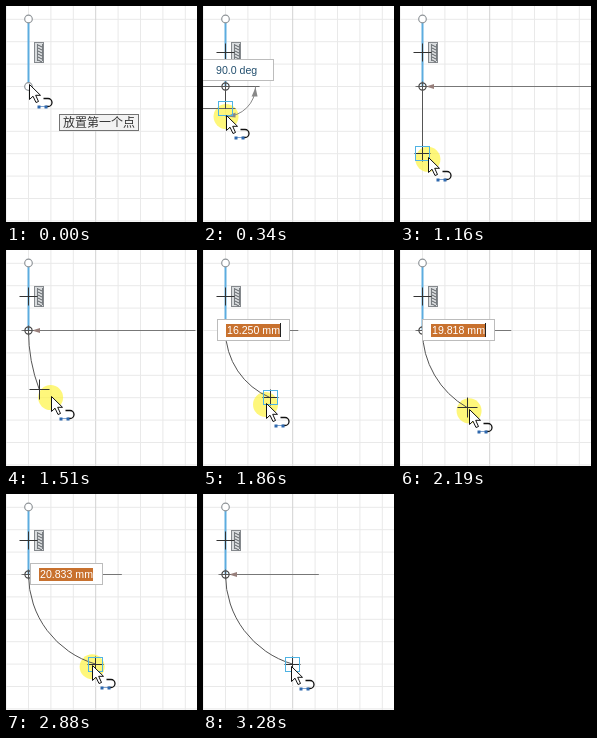
An HTML page with a canvas that plays this animation: 191 px wide and 216 px high, repeating every 3480 ms.

```html
<!DOCTYPE html>
<html lang="zh">
<head>
<meta charset="utf-8">
<style>
html, body { margin: 0; width: 100%; height: 100%; overflow: hidden; background: #fff; }
canvas { display: block; width: 191px; height: 216px; }
</style>
</head>
<body>
<canvas id="stage" width="191" height="216"></canvas>
<script>
const ctx = document.getElementById('stage').getContext('2d');
const LOOP = 3480, MM = 4.48, CELL = 5 * MM;
const X0 = 22.5, Y0 = 80.5;            // first point of the arc
const PLACED = 70, CURVED = 1030, BOX_OUT = 3280;

// Pointer stops: time, x, y
const STOPS = [
  [70, 23, 78], [720, 24, 135], [1030, 24, 135], [1250, 30, 158],
  [1460, 33, 139], [1510, 45, 146], [1790, 63, 153], [2060, 63, 153],
  [2410, 76.26, 165.803], [2480, 76.26, 165.803], [3000, 88, 172], [LOOP, 88, 172]
];

const easeOut = p => 1 - Math.pow(1 - p, 1.46);

function pointerAt(t) {
  t = Math.max(t, STOPS[0][0]);
  const i = STOPS.findIndex(s => s[0] > t);
  const [t1, x1, y1] = STOPS[i - 1], [t2, x2, y2] = STOPS[i];
  const p = easeOut((t - t1) / (t2 - t1));
  return [x1 + (x2 - x1) * p, y1 + (y2 - y1) * p];
}

// The end point trails the pointer a little and sticks to nearby grid nodes.
function endAt(t) {
  const [px, py] = pointerAt(t - 50);
  const dx = t < CURVED ? 0 : (px - X0) / MM, dy = (py - 80) / MM;
  const gx = Math.round(dx / 5) * 5, gy = Math.round(dy / 5) * 5;
  const snapped = gy > 0 && Math.hypot(dx - gx, dy - gy) < 1.8;
  return snapped ? [gx, gy, true] : [dx, dy, false];
}

function stroke(color, width, trace) {
  ctx.strokeStyle = color;
  ctx.lineWidth = width;
  ctx.beginPath();
  trace();
  ctx.stroke();
}

function line(x1, y1, x2, y2, color = '#555', width = 1) {
  stroke(color, width, () => { ctx.moveTo(x1, y1); ctx.lineTo(x2, y2); });
}

function disc(x, y, r, fill) {
  ctx.fillStyle = fill;
  ctx.beginPath();
  ctx.arc(x, y, r, 0, 7);
  ctx.fill();
}

function ring(x, y, r, color, fill) {
  if (fill) disc(x, y, r, fill);
  stroke(color, 1.2, () => ctx.arc(x, y, r, 0, 7));
}

function poly(points, fill, border) {
  ctx.beginPath();
  points.forEach(([x, y]) => ctx.lineTo(x, y));
  ctx.closePath();
  ctx.fillStyle = fill;
  ctx.fill();
  if (border) {
    ctx.strokeStyle = border;
    ctx.lineWidth = 1;
    ctx.stroke();
  }
}

function frame(x, y, w, h, fill, border) {
  ctx.fillStyle = fill;
  ctx.fillRect(x, y, w, h);
  ctx.strokeStyle = border;
  ctx.lineWidth = 1;
  ctx.strokeRect(x + 0.5, y + 0.5, w - 1, h - 1);
}

function cross(x, y, r, color = '#333') {
  x = Math.floor(x) + 0.5;
  y = Math.floor(y) + 0.5;
  line(x - r, y, x + r, y, color);
  line(x, y - r, x, y + r, color);
}

function grid() {
  for (let k = -4; k < 9; k++) {
    const x = X0 + k * CELL, y = Y0 + k * CELL;
    line(x, 0, x, 216, k === 3 ? '#d2d2d2' : '#e9e9e9');
    line(0, y, 191, y, '#e9e9e9');
  }
}

function rulerBadge() {
  frame(28, 36, 10, 21, '#d9dcde', '#85898d');
  line(31.5, 38, 31.5, 55, '#777c80');
  line(36.5, 38, 36.5, 55, '#777c80');
  for (let y = 39; y < 55; y += 3) line(32, y, 36, y + 2, '#5d6266');
}

function valueBox(x, y, text, indent) {
  frame(Math.round(x), y, 73, 22, '#fff', '#bcbcbc');
  ctx.font = '10.6px "Liberation Sans", Arial, sans-serif';
  ctx.fillStyle = '#24506f';
  ctx.fillText(text, Math.round(x) + indent, y + 15);
}

function selectedValue(x, y, text, caret) {
  valueBox(x, y, '', 0);
  const left = Math.round(x) + 10, w = Math.ceil(ctx.measureText(text).width);
  ctx.fillStyle = '#c8712e';
  ctx.fillRect(left - 1, y + 5, w + 1, 13);
  ctx.fillStyle = '#fff';
  ctx.fillText(text, left, y + 15);
  if (caret) line(left + w + 0.5, y + 4, left + w + 0.5, y + 18, '#222');
}

function tooltip() {
  frame(53, 108, 80, 17, '#f2f2f2', '#737373');
  ctx.fillStyle = '#333';
  ctx.font = '12px "Noto Sans CJK SC", "Noto Sans CJK", sans-serif';
  ctx.fillText('放置第一个点', 57, 121);
}

function snapMark(x, y) {
  ctx.strokeStyle = '#4fb3e3';
  ctx.lineWidth = 1;
  ctx.strokeRect(Math.floor(x) - 6.5, Math.floor(y) - 6.5, 14, 14);
}

function pointer(x, y) {
  ctx.save();
  ctx.translate(Math.floor(x) + 0.5, Math.floor(y) + 0.5);
  poly([[0, 0], [0, 15], [3.5, 11.7], [6.5, 18], [9, 17], [6.2, 10.8], [11, 10.8]], '#fff', '#111');
  stroke('#111', 1.3, () => {
    ctx.moveTo(14, 14);
    ctx.lineTo(18.5, 14);
    ctx.arc(18.5, 18, 4, -Math.PI / 2, Math.PI / 2);
    ctx.lineTo(16, 22);
  });
  line(10, 22, 16, 22, '#7fa3cf');
  ctx.fillStyle = '#2f68ad';
  ctx.fillRect(8, 21, 3, 3);
  ctx.fillRect(15, 21, 3, 3);
  ctx.restore();
}

function angleGuide(r, ey) {
  line(0, Y0, X0 + r + 4, Y0, '#666');
  line(0, Math.floor(ey) + 0.5, X0 + 10, Math.floor(ey) + 0.5, '#666');
  line(X0, Y0, X0, ey, '#444');
  stroke('#888', 1, () => ctx.arc(X0, Y0, r, 0, Math.PI / 2));
  if (r > 12) {
    poly([[X0 + r, Y0 + 1], [X0 + r - 4, Y0 + 10], [X0 + r + 2, Y0 + 10]], '#888');
    poly([[X0 + 1, Y0 + r], [X0 + 10, Y0 + r - 4], [X0 + 10, Y0 + r + 1]], '#888');
  }
}

// The arc leaves the first point vertically, so its centre lies level with it.
function tangentArc(dx, dy, radius) {
  line(X0 - 7, Y0, Math.min(191, X0 + radius), Y0, '#777');
  poly([[26, Y0], [34, Y0 - 2.5], [34, Y0 + 2.5]], '#977f7b');
  if (dx < 0.01) return line(X0, Y0, X0, Y0 + dy * MM);
  const end = Math.PI - Math.atan2(dy * MM, radius - dx * MM);
  stroke('#555', 1, () => ctx.arc(X0 + radius, Y0, radius, Math.PI, end, true));
}

function draw(t) {
  const [cx, cy] = pointerAt(t);
  const [dx, dy, snapped] = endAt(t);
  const ex = X0 + dx * MM, ey = Y0 + dy * MM;
  const radius = dx < 0.01 ? 999 : (dx * dx + dy * dy) / (2 * dx) * MM;
  const curved = t >= CURVED;

  ctx.fillStyle = '#fff';
  ctx.fillRect(0, 0, 191, 216);
  grid();
  if (t >= 140 && t < 3150) disc(cx - 0.5, cy + 1.5, 12.5, 'rgba(253,243,60,.68)');

  line(X0, 13, X0, Y0, '#5cacdf', 2);
  ring(X0, 13, 3.8, '#8f9498', '#fff');
  rulerBadge();

  if (t < PLACED) {
    ring(X0, Y0, 3.8, '#8f9498', '#fff');
    tooltip();
  } else {
    cross(X0, 46, 9);
    if (curved) tangentArc(dx, dy, radius);
    else angleGuide(Math.max(0, cy - 79), ey);
    ring(X0, Y0, 3.6, '#444');
    cross(X0, Y0, 5, '#555');
    if (curved) cross(ex, ey, snapped ? 8 : 10);
    if (snapped) snapMark(ex, ey);
  }

  if (t >= 270 && !curved) {
    const travel = cy - 109;
    valueBox(-2 + 0.69 * travel, Math.round(53 + 1.23 * travel), '90.0 deg', 15);
  }
  if (t >= 1650 && t < BOX_OUT) {
    const caret = Math.floor(t / 600) % 2 === 1;
    selectedValue(radius / 2 - 22.8, 69, (radius / MM).toFixed(3) + ' mm', caret);
  }
  pointer(cx, cy);
}

function tick() {
  draw(performance.now() % LOOP);
  requestAnimationFrame(tick);
}
tick();
</script>
</body>
</html>
```
